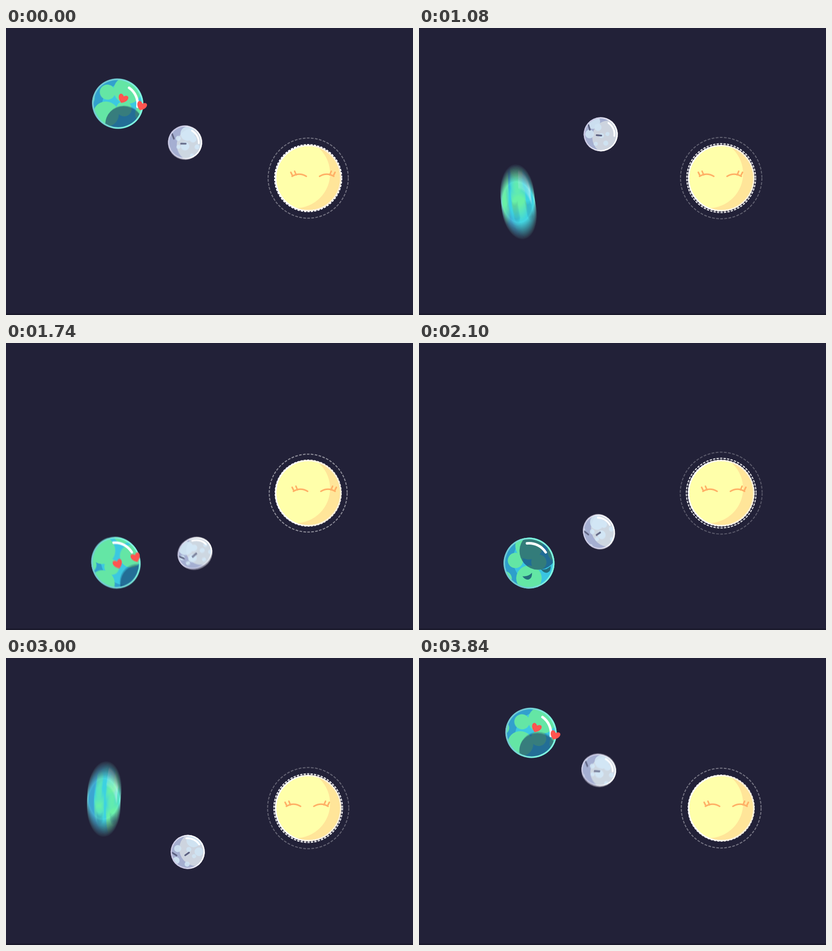
Animation of 800 by 564 pixels, one loop 3870 ms. Source, as an HTML page with a canvas:

```html
<!DOCTYPE html>
<html lang="en">
<head>
<meta charset="utf-8">
<title>Planets</title>
<style>
html, body { margin: 0; width: 100%; height: 100%; overflow: hidden; background: #222138; }
canvas { display: block; }
</style>
</head>
<body>
<canvas id="stage" width="800" height="564"></canvas>
<script>
const W = 800, H = 564, LOOP = 3870, HALF = LOOP / 2;
const SUN = { x: 594, y: 295, r: 65 };
const ctx = document.getElementById('stage').getContext('2d');
const newLayer = () => Object.assign(document.createElement('canvas'), { width: W, height: H }).getContext('2d');
const layer = newLayer(), blend = newLayer();
const rad = deg => deg * Math.PI / 180;

// Swing, squash and face tracks: [ms, value], eased between the keys
const SWING = [[770, 0], [910, -5.2], [1220, 49.8], [1520, 35.7], [1870, 41.7], [2090, 40]];
const SQUASH = [[770, 1], [890, 1.05], [1050, .66], [1340, 1.07], [1640, .93], [1880, 1.01], [2150, 1]];
const FACE_X = [[0, 6], [600, -11], [1000, -11], [1400, 6], [1600, 6], [2100, -11], [3000, -11], [3600, 6]];
const FACE_Y = [[0, -13], [600, 17], [1000, 17], [1400, -1], [1600, -1], [2100, 24], [3000, 24], [3600, -13]];

// Circles on the surface: x, y, radius
const LANDS = [[-27, -14, 15], [8, -32, 27], [-14, 28, 25], [15, 5, 15], [59, -2, 22], [60, -49, 20], [-60, 12, 15], [-62, -24, 10]];
const CRATERS = [[0, -18, 14], [2, 7, 8.5], [13, -11, 7], [25, 2, 5], [35, -5, 4], [38, 13, 5], [20, 21, 4], [-35, -13, 7], [-46, 8, 7], [-15, -4, 5], [-10, 12, 4], [-28, 22, 5]];

function track(keys, t) {
  if (t <= keys[0][0]) return keys[0][1];
  for (let i = 1; i < keys.length; i++) {
    const [t0, a] = keys[i - 1], [t1, b] = keys[i];
    if (t < t1) return a + (b - a) * (1 - Math.cos(Math.PI * (t - t0) / (t1 - t0))) / 2;
  }
  return keys[keys.length - 1][1];
}

// Orbit angle and squash; each half loop crosses to the other side
function pose(t) {
  const n = Math.floor((t - 700) / HALF), phase = t - n * HALF;
  const turn = track(SWING, phase);
  return { angle: rad(n & 1 ? turn - 20 : 20 - turn), squash: track(SQUASH, phase) };
}
const earthPose = t => pose(t);
const moonPose = t => pose(t - 450);
const spin = t => -5 - 52 * Math.cos(2 * Math.PI * (t - 1030) / LOOP);

function disc(c, x, y, r, fill) {
  c.beginPath();
  c.arc(x, y, r, 0, 2 * Math.PI);
  c.fillStyle = fill;
  c.fill();
}

function line(c, color, width, ...pts) {
  c.beginPath();
  c.moveTo(pts[0], pts[1]);
  if (pts.length > 4) c.quadraticCurveTo(pts[2], pts[3], pts[4], pts[5]);
  else c.lineTo(pts[2], pts[3]);
  c.strokeStyle = color;
  c.lineWidth = width;
  c.stroke();
}

function rim(c, r, width, from, to) {
  const g = c.createLinearGradient(-r, 0, r, 0);
  g.addColorStop(.2, from);
  g.addColorStop(.8, to);
  c.beginPath();
  c.arc(0, 0, r - width / 2, 0, 2 * Math.PI);
  c.strokeStyle = g;
  c.lineWidth = width;
  c.stroke();
}

function shine(c, r, width) {
  c.beginPath();
  c.arc(0, 0, r, rad(-76), rad(-13));
  c.strokeStyle = '#fff';
  c.lineWidth = width;
  c.stroke();
}

function globe(c, r, dark, light, shift, spots, spotFill, offset) {
  c.beginPath();
  c.arc(0, 0, r, 0, 2 * Math.PI);
  c.clip();
  disc(c, 0, 0, r, dark);
  disc(c, shift, 0, r, light);
  for (const [x, y, size] of spots) disc(c, x + offset, y, size, spotFill);
}

function heart(c, x, y) {
  c.beginPath();
  c.moveTo(x, y + 9);
  c.bezierCurveTo(x - 16, y, x - 9, y - 15, x, y - 5);
  c.bezierCurveTo(x + 9, y - 15, x + 16, y, x, y + 9);
  c.fillStyle = '#ff524f';
  c.fill();
}

function smile(c, x, y) {
  c.beginPath();
  c.moveTo(x - 10, y - 4);
  c.quadraticCurveTo(x, y + 1, x + 10, y - 4);
  c.quadraticCurveTo(x + 7, y + 6, x, y + 6);
  c.quadraticCurveTo(x - 7, y + 6, x - 10, y - 4);
  c.fillStyle = '#246f7c';
  c.fill();
}

function drawEarth(c, t) {
  const x = track(FACE_X, t), y = track(FACE_Y, t);
  const inLove = t < 300 || t > 3650 || (t > 1250 && t < 1800);
  const eyes = draw => [0, 39].forEach(dx => draw(c, x + dx, y));
  const gap = moonPose(t).angle - earthPose(t).angle;
  c.save();
  globe(c, 50, '#2e9fcb', '#3ac5e1', 20, LANDS, '#63e6a5', spin(t));
  if (!inLove && t < 3000) eyes(smile);
  disc(c, 402 - 377 * Math.cos(gap), -377 * Math.sin(gap), 37, 'rgba(10,31,86,.53)');
  c.restore();
  rim(c, 50, 3, '#70c8d2', '#80f7df');
  shine(c, 39, 5);
  if (inLove) eyes(heart);
}

function drawMoon(c, t) {
  c.save();
  globe(c, 33.5, '#a5afd0', '#cdd4df', 18, CRATERS, 'rgba(208,228,243,.9)', spin(t) * .4);
  line(c, '#5b6080', 3.2, -29, -9, -23, -1);
  line(c, '#5b6080', 3.2, -7, 4.5, 2, 2);
  c.restore();
  rim(c, 33.5, 2.5, '#cbc9e4', '#fff');
  shine(c, 27, 3.5);
}

// Averages several moments of a short exposure
function drawBody(t, orbit, poseAt, draw) {
  const shutter = 18;
  const travel = Math.abs(poseAt(t + 9).angle - poseAt(t - 9).angle) * orbit;
  const n = travel < .6 ? 1 : travel < 6 ? 5 : 15;
  blend.clearRect(0, 0, W, H);
  blend.globalCompositeOperation = 'lighter';
  blend.globalAlpha = 1 / n;
  for (let i = 0; i < n; i++) {
    const s = (t + shutter * ((i + .5) / n - .5) + LOOP) % LOOP;
    const { angle, squash } = poseAt(s);
    layer.clearRect(0, 0, W, H);
    layer.save();
    layer.lineCap = 'round';
    layer.translate(SUN.x, SUN.y);
    layer.rotate(angle);
    layer.translate(-orbit, 0);
    layer.scale(squash, 1 + (1 - squash) * (squash < 1 ? .45 : 2));
    draw(layer, s);
    layer.restore();
    blend.drawImage(layer.canvas, 0, 0);
  }
  ctx.drawImage(blend.canvas, 0, 0);
}

function ring(r, alpha) {
  const k = r / SUN.r;
  ctx.beginPath();
  ctx.arc(0, 0, r, 0, 2 * Math.PI);
  ctx.setLineDash([4.4 * k, 2.2 * k]);
  ctx.strokeStyle = `rgba(255,255,255,${alpha})`;
  ctx.lineWidth = 2;
  ctx.stroke();
  ctx.setLineDash([]);
}

function drawSun(t) {
  ctx.save();
  ctx.translate(SUN.x, SUN.y);
  ctx.lineCap = 'butt';
  for (let i = 0; i < 2; i++) {
    const age = (t % (LOOP / 4) + i * LOOP / 4) / 1000;
    if (age < 1.51) ring(66 + 15.5 * age - 2.4 * age * age, Math.max(0, 1 - .66 * age));
  }
  ring(65, .9);
  ctx.save();
  ctx.beginPath();
  ctx.arc(0, 0, SUN.r, 0, 2 * Math.PI);
  ctx.clip();
  disc(ctx, 0, 0, SUN.r, '#ffe599');
  disc(ctx, -25, -9, 68, '#ffffaa');
  ctx.restore();
  rim(ctx, SUN.r, 2.5, '#fff', '#fff0d8');

  ctx.lineCap = 'round';
  ctx.translate(2.5 + 9.5 * Math.cos(2 * Math.PI * (t - 1700) / HALF), -3);
  for (const side of [-1, 1]) {
    ctx.save();
    ctx.scale(side, 1);
    line(ctx, '#ffb066', 3, 13, -.5, 27, -9, 41, -.5);
    line(ctx, '#ffb066', 3, 40, -1.5, 43.5, -8.5);
    line(ctx, '#ffb066', 3, 33, -3.5, 36, -10.5);
    ctx.restore();
  }
  ctx.restore();
}

function frame(now) {
  const t = now % LOOP;
  ctx.fillStyle = '#222138';
  ctx.fillRect(0, 0, W, H);
  ctx.fillStyle = '#1b1a2c';
  ctx.fillRect(0, 561, W, 3);
  drawSun(t);
  drawBody(t, 402, earthPose, drawEarth);
  drawBody(t, 252, moonPose, drawMoon);
}

const start = performance.now();
(function tick() {
  frame(performance.now() - start);
  requestAnimationFrame(tick);
})();
</script>
</body>
</html>
```
